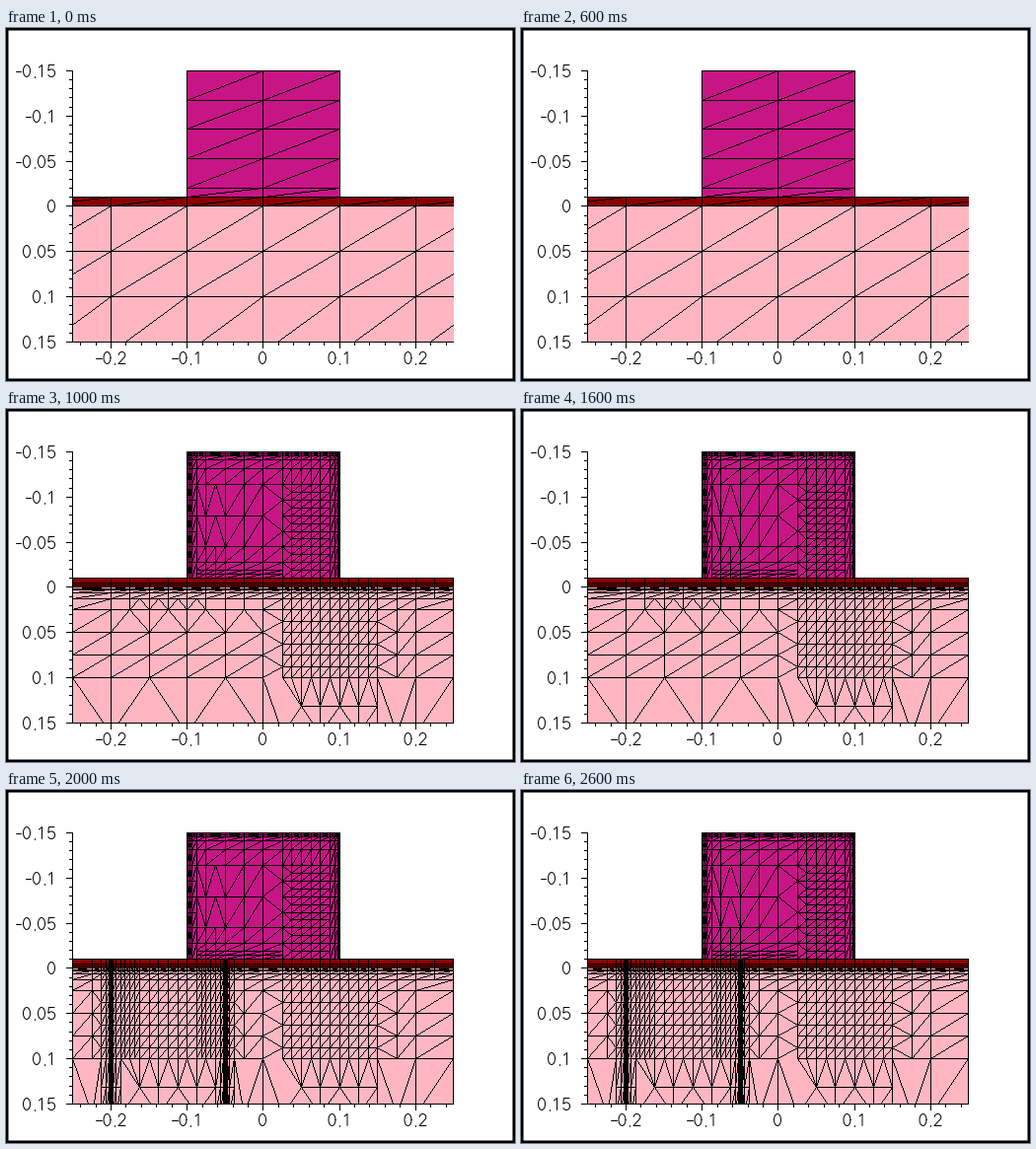
These frames come from a looping animation (516 by 358 pixels, 3000 ms). A matplotlib script:

```python
import numpy as np
import matplotlib.pyplot as plt
from matplotlib.animation import FuncAnimation
from matplotlib.collections import LineCollection
from matplotlib.patches import Rectangle

W, H, DPI = 516, 358, 100
PX = 72 / DPI
LEFT, RIGHT, TOP, BOTTOM = 67, 453, 43, 318
OXIDE_Y, SURFACE_Y = 171, 180
GATE, OXIDE, SILICON = "#c71585", "#8b0000", "#ffb6c1"
UNIT = 0.0125  # finest regular mesh spacing


def px(v):
    return round(260.4 + 772 * v)


def py(v):
    return round(180.4 + 916.7 * v)


def cols(a, b, step=1):
    """Columns a to b, counted in mesh units from the left edge."""
    return [px(-0.25 + UNIT * k) for k in np.arange(a, b + step / 2, step)]


def rows(a, b, step=1):
    """Rows a to b, counted in mesh units down from the surface."""
    return [py(UNIT * k) for k in np.arange(a, b + step / 2, step)]


def graded(end, start, n):
    """Positions from start that halve their distance to end n times."""
    return [end + (start - end) / 2 ** k for k in range(n + 1)] + [end]


def merge(*parts):
    return sorted({round(v) for part in parts for v in part})


def grid(xs, ys, diagonal=True, thin=2):
    """Cells split from lower left to upper right, unless they are thin."""
    xs, ys = merge(xs), merge(ys)
    segs = [[(xs[0], y), (xs[-1], y)] for y in ys]
    segs += [[(x, ys[0]), (x, ys[-1])] for x in xs]
    if diagonal:
        segs += [[(a, d), (b, c)] for a, b in zip(xs, xs[1:])
                 for c, d in zip(ys, ys[1:]) if min(b - a, d - c) >= thin]
    return segs


def zigzag(xs, y0, y1):
    return [[(x, (y0, y1)[i % 2]) for i, x in enumerate(xs)]]


def side_zigzag(x0, x1, ys):
    return [[((x0, x1)[i % 2], y) for i, y in enumerate(ys)]]


def coarse_mesh():
    wide = cols(-4, 44, 8)
    return (grid(cols(12, 28, 8), merge(np.linspace(TOP, 162, 5), [OXIDE_Y]))
            + grid(wide, [OXIDE_Y, SURFACE_Y])
            + grid(wide, rows(0, 8, 4) + rows(13, 13)))


def gate_mesh():
    x = dict(zip(range(12, 29), cols(12, 28)))
    upper, lower = np.linspace(76, OXIDE_Y, 4)[:2]
    near_top = graded(TOP, upper, 4)
    near_oxide = graded(OXIDE_Y, 139, 3)
    middle = [upper, lower, 139]
    fine_y = np.linspace(upper, OXIDE_Y, 13)
    wall_l, wall_r = graded(x[12], x[13], 3), graded(x[28], x[27], 3)
    wide = cols(14, 20, 2) + cols(22, 27)

    segs = grid(merge(wall_l, wide, wall_r), near_top)
    for wall in (wall_l, wall_r):
        segs += grid(wall, fine_y[::2])
    segs += grid(cols(16, 20, 2), middle)
    segs += grid([x[13], x[14], x[16]], middle, False)
    for y0, y1 in zip(middle, middle[1:]):
        segs += zigzag(cols(13, 16), y0, y1)
    segs += grid(cols(13, 15) + cols(16, 22, 2), near_oxide)
    segs += grid(cols(23, 27), fine_y)
    segs += side_zigzag(x[20], x[22], fine_y[:9:2])
    segs += side_zigzag(x[22], x[23], fine_y)
    segs += grid([x[22], x[23]], fine_y[::2], False)
    return segs


def surface_mesh(xs):
    """Thin layers on both sides of the silicon surface."""
    return (grid(xs, graded(SURFACE_Y, OXIDE_Y, 2), False)
            + grid(xs, graded(SURFACE_Y, rows(1, 1)[0], 3)))


def fan_below(a, b):
    """Halve the column count below a fine block, down to the lower edge."""
    y0, y1, y2 = rows(8, 13, 2.5)
    low = cols(a + 2, b, 2)
    return (zigzag(cols(a + 1, b), y0, y1) + grid(low, [y0, y1], False)
            + zigzag(low, y1, y2) + [[(x, y1), (x, y2)] for x in low[1::2]]
            + [[cell, (low[0], y1)] for cell in
               ((px(-0.25 + UNIT * a), y0), (px(-0.25 + UNIT * a), y2))])


def right_block():
    (x20, x22), (x32, x34, x36) = cols(20, 22, 2), cols(32, 36, 2)
    y8, y13 = rows(8, 13, 5)
    segs = grid(cols(22, 32), rows(1, 8))
    segs += side_zigzag(x20, x22, rows(2, 8))
    segs += side_zigzag(x34, x32, rows(2, 8))
    segs += grid([x34, x36, RIGHT], rows(2, 8, 2))
    segs += grid([x20, x22], rows(1, 2)) + grid([x32, x34], rows(1, 2))
    segs += grid([x34, x36, RIGHT], rows(1, 2))
    segs += [[(x32, y), (x34, y)] for y in rows(4, 8, 2)]
    segs += fan_below(22, 32)
    segs += zigzag([x32, x34, x36], y8, y13)
    segs += [[(x, y8), (x, y13)] for x in (x20, x32, x36)]
    segs += [[(x20, y8), (x22, y13)], [(x36, y13), (RIGHT, y8)],
             [(RIGHT, TOP + 128), (RIGHT, BOTTOM)]]
    return segs


def medium_mesh():
    y1, y2, y4 = rows(1, 2) + rows(4, 4)
    y8, y13 = rows(8, 13, 5)
    segs = gate_mesh() + right_block()
    segs += surface_mesh(cols(0, 4, 4) + cols(6, 22, 2) + cols(23, 32)
                         + cols(34, 40, 2))
    segs += grid(cols(0, 20, 4), rows(4, 8, 2))
    segs += grid(cols(0, 4, 4), [y1, y2, y4])
    segs += grid(cols(4, 20, 4), [y2, y4], False)
    segs += zigzag(cols(4, 20, 2), y4, y2)
    segs += grid(cols(4, 20, 2), [y1, y2], False)
    segs += zigzag(cols(6, 14), y2, y1)
    segs += zigzag(cols(0, 20, 4), y8, y13)
    segs += [[(x, y8), (x, y13)] for x in cols(4, 20, 8)]
    return segs


def fine_mesh():
    y8, y13 = rows(8, 13, 5)
    xs = cols(5, 7, 0.5) + cols(8, 12) + cols(13, 15, 0.5)
    segs = gate_mesh() + right_block()
    for k in (4, 16):
        a, c, b = cols(k - 1, k + 1)
        junction = merge(graded(c, a, 3), graded(c, b, 3))
        segs += grid(junction, rows(8, 13, 2.5))
        xs += junction
    segs += surface_mesh(cols(0, 2, 2) + xs + cols(18, 22, 2) + cols(23, 32)
                         + cols(34, 40, 2))
    segs += grid(xs, rows(1, 8)) + fan_below(5, 15)
    for outer, inner, edge in ((2, 3, 0), (18, 17, 20)):
        (xo,), (xi,), (xe,) = (cols(k, k) for k in (outer, inner, edge))
        segs += side_zigzag(xo, xi, rows(2, 8))
        segs += grid([xo, xe], rows(1, 2) + rows(4, 8, 2))
        segs += [[(xo, y), (xi, y)] for y in rows(2, 8, 2)]
        segs += zigzag([xi, xo, xe], y8, y13)
    return segs


def raster(segs):
    """Paint one-pixel lines without smoothing on a clear layer."""
    layer = np.zeros((H, W, 4))
    for path in segs:
        for (xa, ya), (xb, yb) in zip(path, path[1:]):
            n = int(max(abs(xb - xa), abs(yb - ya))) + 1
            x = np.rint(np.linspace(xa, xb, n)).astype(int)
            y = np.rint(np.linspace(ya, yb, n)).astype(int)
            seen = (x >= LEFT) & (x <= RIGHT) & (y >= TOP) & (y <= BOTTOM)
            layer[y[seen], x[seen], 3] = 1
    return layer


def arc(cx, cy, rx, ry, a, b):
    t = np.radians(np.linspace(a, b, 24))
    return list(zip(cx + rx * np.cos(t), cy + ry * np.sin(t)))


# Thin plotter numerals: advance and pen stroke, 12 pixels tall
GLYPHS = {
    "0": (10, arc(4, 6, 3.5, 6, 0, 360)),
    "1": (10, [(1.5, 2.5), (4.5, 0), (4.5, 12)]),
    "2": (10, arc(4, 3.3, 3.3, 3.3, 185, 395) + [(0.5, 12), (7.5, 12)]),
    "5": (10, [(7, 0), (1.4, 0), (0.8, 5.5)] + arc(4, 8.2, 3.6, 3.8, 225, 510)),
    ".": (5, [(1.5, 11), (1.5, 12)]),
    "-": (8, [(0.5, 6.5), (6, 6.5)]),
}

fig = plt.figure(figsize=(W / DPI, H / DPI), dpi=DPI, facecolor="white")
ax = fig.add_axes([0, 0, 1, 1])
ax.axis("off")


def box(x0, y0, x1, y1, color):
    ax.add_patch(Rectangle((x0, y0), x1 - x0, y1 - y0, fc=color, lw=0,
                           antialiased=False))


def strokes(segs, **kw):
    ax.add_collection(LineCollection(segs, colors="black", linewidths=PX, **kw),
                      autolim=False)


def label(x, y, value, align):
    text = f"{value:g}"
    x -= align * (sum(GLYPHS[c][0] for c in text) - 2)
    pens = []
    for c in text:
        advance, pen = GLYPHS[c]
        pens.append(np.array(pen) + (x, y - 6))
        x += advance
    strokes(pens, capstyle="round")


image = ax.imshow(np.zeros((H, W, 4)), extent=(0, W, H, 0), aspect="auto",
                  interpolation="nearest", zorder=3)
ax.set_xlim(0, W)
ax.set_ylim(H, 0)

box(px(-0.1), TOP, px(0.1) + 1, OXIDE_Y, GATE)
box(LEFT, OXIDE_Y, RIGHT + 1, SURFACE_Y, OXIDE)
box(LEFT, SURFACE_Y, RIGHT + 1, BOTTOM + 1, SILICON)
ax.add_patch(Rectangle((0, 0), W, H, fill=False, ec="black", lw=5 * PX,
                       snap=False))

box(LEFT, TOP, LEFT + 1, BOTTOM + 1, "black")
box(LEFT, BOTTOM, RIGHT + 1, BOTTOM + 1, "black")
for i in range(-15, 16):
    y = py(i / 100)
    box(61 if i % 5 == 0 else 64, y, LEFT, y + 1, "black")
    if i % 5 == 0:
        label(50, y + 0.5, i / 100, 1)
for i in range(-12, 13):
    x = px(i / 50)
    box(x, BOTTOM, x + 1, 325 if i % 5 == 0 else 322, "black")
    if i % 5 == 0:
        label(x, 334.5, i / 50, 0.5)

layers = [raster(mesh()) for mesh in (coarse_mesh, medium_mesh, fine_mesh)]


def update(i):
    image.set_data(layers[i])
    return [image]


anim = FuncAnimation(fig, update, frames=len(layers), interval=1000,
                     repeat=True, repeat_delay=0)
plt.show()
```
